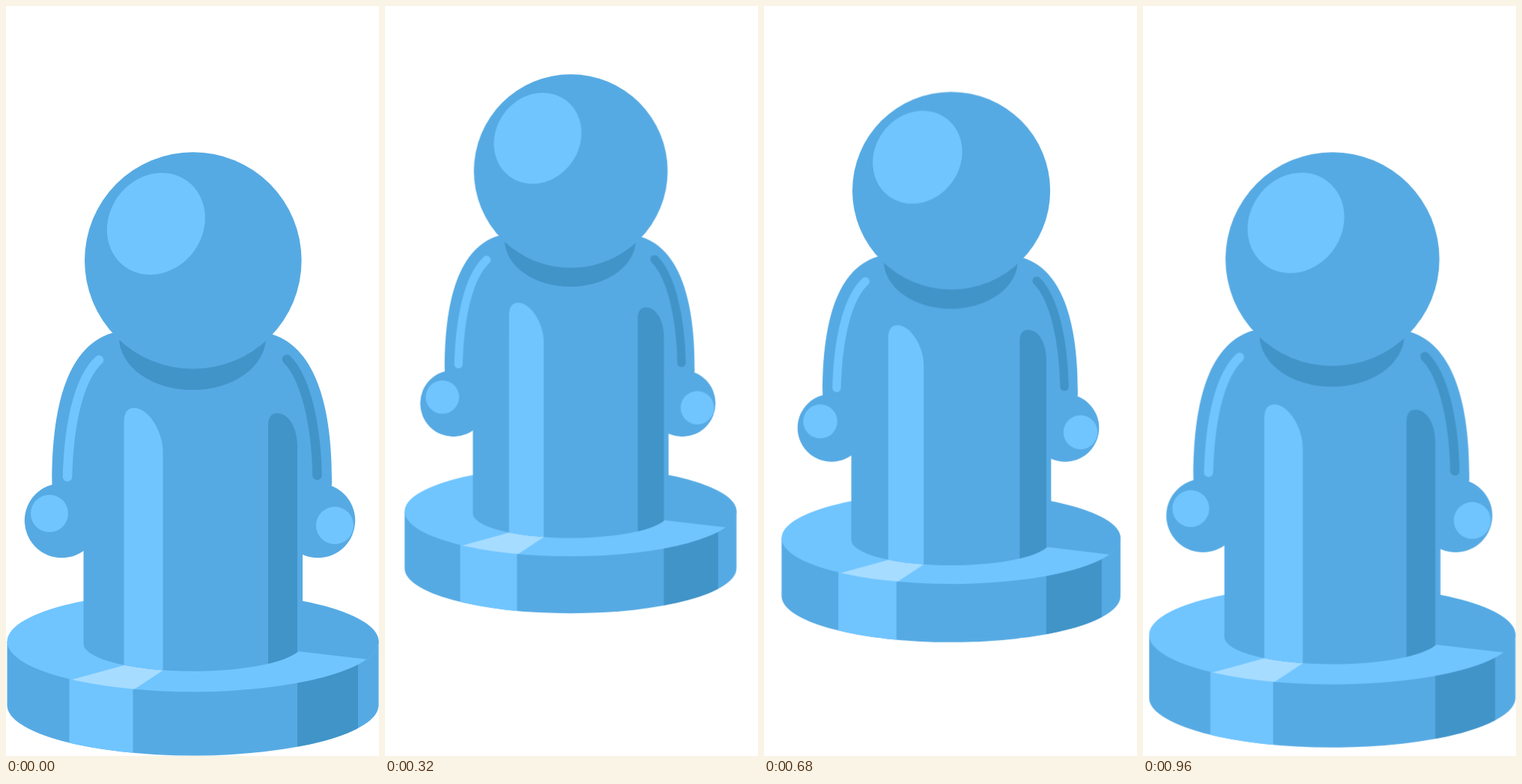
These frames come from a looping animation (498 by 1002 pixels, 1000 ms). An HTML page:

```html
<!DOCTYPE html>
<html lang="en">
<head>
<meta charset="utf-8">
<title>Pawn figure</title>
<style>
  html, body { margin: 0; width: 100%; height: 100%; overflow: hidden; background: #fff; }
  svg { display: block; width: 100%; height: 100%; }
  .main { fill: #56aae3; }
  .light { fill: #70c5ff; }
  .dark { fill: #4194c8; }
  .pale { fill: #a6dcff; }
  .arm { fill: none; stroke-width: 12.5; stroke-linecap: round; }

  /* Each segment advances in 40 ms steps. */
  #figure { transform-origin: 0 0; animation: hop 1s infinite; }
  @keyframes hop {
    0%   { transform: translate(0, 0) scale(1); animation-timing-function: steps(6); }
    24%  { transform: translate(18.9px, -63.1px) scale(.919); animation-timing-function: steps(4); }
    40%  { transform: translate(30.8px, -103.3px) scale(.8675); animation-timing-function: steps(1); }
    44%  { transform: translate(34.8px, -117.7px) scale(.85); animation-timing-function: steps(2); }
    52%  { transform: translate(30.2px, -98px) scale(.872); animation-timing-function: steps(4); }
    68%  { transform: translate(22.2px, -63.4px) scale(.912); animation-timing-function: steps(3); }
    80%  { transform: translate(15.9px, -35.5px) scale(.9415); animation-timing-function: steps(4); }
    96%, 100% { transform: translate(6.6px, 2.8px) scale(.9862); }
  }
</style>
</head>
<body>
<svg viewBox="0 0 498 1002" preserveAspectRatio="none">
  <defs>
    <path id="side" d="M1.5 849V934A248 67.5 0 0 0 497.5 934V849Z"/>
    <ellipse id="top" cx="249.5" cy="849" rx="248" ry="67.2"/>
    <path id="body" d="M61.5 640C61 547 77 457 141 437L355 438.5C418 458 436 547 435 640L396 700V852A146.25 36.8 0 0 1 103.5 852V700Z"/>
    <clipPath id="inSide"><use href="#side"/></clipPath>
    <clipPath id="inTop"><use href="#top"/></clipPath>
    <clipPath id="inBody"><use href="#body"/></clipPath>
  </defs>
  <g id="figure">
    <use href="#side" class="main"/>
    <g clip-path="url(#inSide)">
      <path class="light" d="M84.5 840H169.5V1002H84.5Z"/>
      <path class="dark" d="M389 840H470V1002H389Z"/>
    </g>
    <use href="#top" class="light"/>
    <g clip-path="url(#inTop)">
      <path class="main" d="M300 770L380 861L389 862L483 873L500 875V770Z"/>
      <path class="pale" d="M84 901L157 881V870H209V888L169.5 914V920H84Z"/>
    </g>

    <use href="#body" class="main"/>
    <circle class="main" cx="74.5" cy="687.5" r="49.7"/>
    <circle class="main" cx="416.5" cy="687.5" r="49.7"/>
    <circle class="light" cx="58" cy="678" r="25"/>
    <circle class="light" cx="439" cy="694" r="25"/>
    <path class="arm" stroke="#70c5ff" d="M124 473C98 497 84 555 82 629"/>
    <path class="arm" stroke="#4194c8" d="M375 472C400 497 414 558 415.5 627"/>
    <g clip-path="url(#inBody)">
      <path class="light" d="M157.5 556Q157.5 537 171 537C190 537 209.5 568 209.5 596V900H157.5Z"/>
      <path class="dark" d="M350 561Q350 544 362 544C377 544 389 562 389 590V900H350Z"/>
    </g>

    <path class="dark" d="M151 443A98 70 0 0 0 347 443Z"/>
    <circle class="main" cx="249.8" cy="340" r="144.8"/>
    <ellipse class="light" rx="70.8" ry="62.5" transform="translate(200.3 291) rotate(-54)"/>
  </g>
</svg>
</body>
</html>
```
